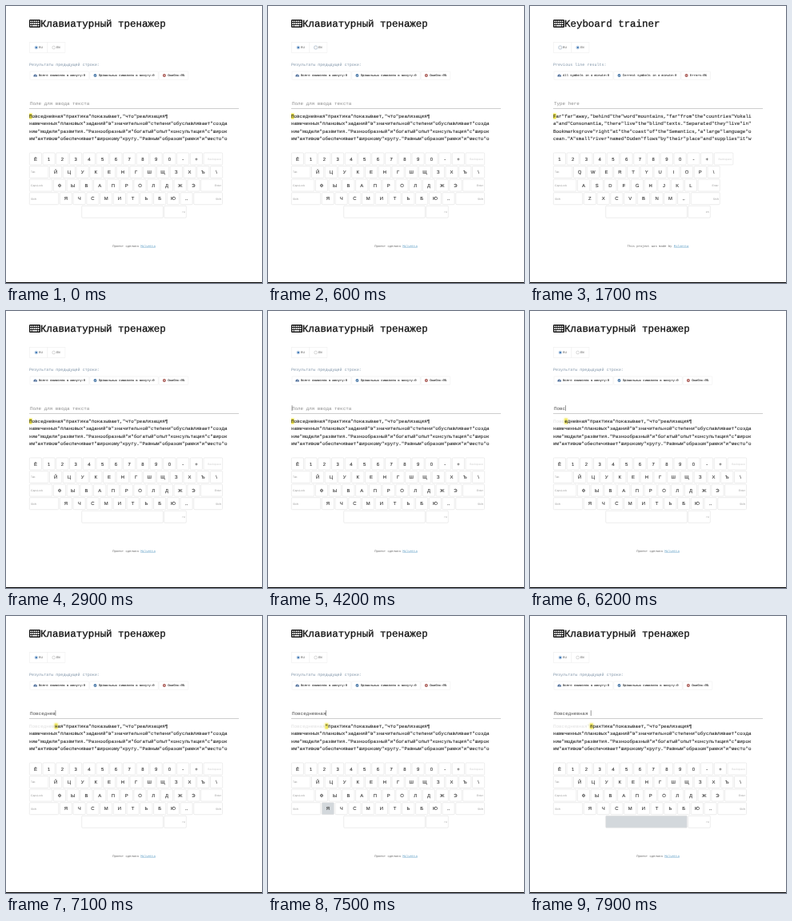
These frames come from a looping animation (320x347 px, 8 s). An HTML page:

```html
<!DOCTYPE html>
<html lang="ru">
<head>
<meta charset="utf-8">
<title>Keyboard trainer</title>
<style>
  html, body { margin: 0; width: 100%; height: 100%; overflow: hidden; background: #fff; }
  svg { display: block; width: 100vw; height: 100vh; text-rendering: geometricPrecision; }
  text { font-family: "Liberation Mono", "DejaVu Sans Mono", monospace; white-space: pre; }
  .sans { font-family: "Liberation Sans", Arial, sans-serif; }
</style>
</head>
<body>
<svg id="stage" viewBox="0 0 320 347"></svg>
<script>
const LOOP = 8000;
const CELL = 3.543;      // advance of one character in the practice text
const SMALL = 3.885;     // small label font size
const SMALL_CELL = SMALL * 0.6;
const PITCH = 16.75;     // distance between keys
const KEY = 15.75;
const X0 = 29;

const LANGS = {
  ru: {
    title: 'Клавиатурный тренажер',
    results: 'Результаты предыдущей строки:',
    stats: ['Всего символов в минуту:0', 'Правильных символов в минуту:0', 'Ошибок:0%'],
    hint: 'Поле для ввода текста',
    lines: [
      'Повседневная практика показывает, что реализация¶',
      'намеченных плановых заданий в значительной степени обуславливает созда',
      'ние модели развития. Разнообразный и богатый опыт консультация с широк',
      'им активом обеспечивает широкому кругу. Равным образом рамки и место о'
    ],
    rows: ['Ё1234567890-+', 'ЙЦУКЕНГШЩЗХЪ\\', 'ФЫВАПРОЛДЖЭ', 'ЯЧСМИТЬБЮ‥'],
    right: 270.8,
    made: 'Проект сделала '
  },
  en: {
    title: 'Keyboard trainer',
    results: 'Previous line results:',
    stats: ['All symbols in a minute:0', 'Correct symbols in a minute:0', 'Errors:0%'],
    hint: 'Type here',
    lines: [
      'Far far away, behind the word mountains, far from the countries Vokali',
      'a and Consonantia, there live the blind texts. Separated they live in ',
      'Bookmarksgrove right at the coast of the Semantics, a large language o',
      'cean. A small river named Duden flows by their place and supplies it w'
    ],
    rows: ['1234567890-+', 'QWERTYUIOP\\', 'ASDFGHJKL', 'ZXCVBNM‥'],
    right: 237.6,
    made: 'This project was made by '
  }
};
const AUTHOR = 'Milvetta';

// Times at which each character lands in the input
const TYPED = [5100, 5400, 5900, 6200, 6400, 6500, 6800, 7000, 7100, 7200, 7300, 7500, 7900];

// Key, time down, time up
const PRESSES = [
  ['Shift', 4800, 5300], ['П', 5100, 5200], ['О', 5400, 5500],
  ['Е', 6400, 6500], ['Д', 6500, 6600], ['Н', 6800, 6900],
  ['Е', 7000, 7100], ['Н', 7200, 7300], ['Я', 7500, 7600], ['Space', 7900, 8000]
];

const stage = document.getElementById('stage');
const esc = s => s.replace(/&/g, '&amp;').replace(/</g, '&lt;');

const rect = (x, y, w, h, fill, extra = '') =>
  `<rect x="${x}" y="${y}" width="${w}" height="${h}" fill="${fill}" ${extra}/>`;
const circle = (x, y, r, fill, extra = '') =>
  `<circle cx="${x}" cy="${y}" r="${r}" fill="${fill}" ${extra}/>`;
const path = (d, stroke, width) =>
  `<path d="${d}" fill="none" stroke="${stroke}" stroke-width="${width}"/>`;
const text = (s, x, y, size, fill, extra = '') =>
  `<text x="${x}" y="${y}" font-size="${size}" fill="${fill}" ${extra}>${esc(s)}</text>`;

function header(lang) {
  let out = rect(X0, 17, 14, 10, '#111', 'rx="1.2"');
  for (let row = 0; row < 2; row++)
    for (let i = 0; i < 5; i++)
      out += rect(30.2 + i * 2.4, 18.4 + row * 2.7, 1.7, 1.7, '#fff', 'rx=".2"');
  out += rect(30.2, 23.8, 1.7, 1.7, '#fff') + rect(32.6, 23.8, 6.5, 1.7, '#fff')
    + rect(39.8, 23.8, 1.7, 1.7, '#fff');
  return out + text(lang.title, 43, 26, 12.45, '#111', 'stroke="#111" stroke-width=".3"');
}

function radio(label, x, on, focus) {
  const ring = focus ? circle(x, 52, 2.7, '#d5e4f4') : '';
  const dot = on ? circle(x, 52, 1.2, '#3f78b5') : '';
  return ring + circle(x, 52, 1.9, '#fff', `stroke="${on ? '#7ea3cb' : '#aaa'}" stroke-width=".45"`)
    + dot + text(label, x + 3.3, 53.3, SMALL, '#555');
}

function radios(state) {
  const frame = 'stroke="#efefef" stroke-width=".6"';
  return rect(29.3, 45.3, 22.6, 13.4, '#fff', frame) + rect(51.9, 45.3, 22, 13.4, '#fff', frame)
    + radio('RU', 37.8, state.code === 'ru', state.radio === 'ru')
    + radio('EN', 59.7, state.code === 'en', state.radio === 'en');
}

const icons = [
  x => `<path d="M${x - 2.2} 88.5a2.3 2.3 0 1 1 4.4 0z" fill="#4f6f9a"/>`
    + path(`M${x} 88L${x + 0.9} 86.1`, '#fff', 0.5),
  x => circle(x, 87, 2, '#4a79a8') + path(`M${x - 1} 87l.8 .8 1.3-1.6`, '#fff', 0.5),
  x => circle(x, 87, 2, '#a5514c') + path(`M${x - 0.8} 86.2l1.6 1.6m0-1.6l-1.6 1.6`, '#fff', 0.5)
];

function stats(lang) {
  let x = 30;
  return lang.stats.map((label, i) => {
    const w = 15.6 + label.length * SMALL_CELL;
    const out = rect(x, 82, w, 10.4, '#fff', 'rx=".8" stroke="#eee" stroke-width=".6"')
      + icons[i](x + 6.7)
      + text(label, x + 11, 88.2, SMALL, '#3a3a3a', 'stroke="#3a3a3a" stroke-width=".12"');
    x += w + 0.9;
    return out;
  }).join('');
}

function input(lang, state) {
  const typed = lang.lines[0].slice(0, state.count);
  const value = typed
    ? text(typed, 30, 123.5, 5.905, '#4a4a4a')
    : text(lang.hint, 30, 123.5, 5.905, '#8c8c8c');
  const caret = state.caret ? rect(30 + state.count * CELL - 0.2, 118.2, 0.5, 6.8, '#333') : '';
  return value + caret + rect(X0, 128.1, 262, 0.7, '#b9b9b9');
}

function practice(lang, state) {
  const mark = s => s.replace(/ /g, '"');
  const x = X0 + state.count * CELL;
  const glow = state.count ? 0.6 : 0.2;
  let out = rect(x - 1, 134, CELL + 2, 7.8, '#f5ec5a',
    `rx="2" opacity="${glow}" filter="url(#glow)"`);
  out += rect(x, 134.6, CELL, 6.8, '#ece246', `opacity="${state.count ? 0.7 : 1}"`);
  lang.lines.forEach((line, i) => {
    const y = 140.3 + i * 9.1;
    const skip = i ? 0 : state.count;
    if (skip) out += text(mark(line.slice(0, skip)), X0, y, 5.905, '#dedede');
    out += text(mark(line.slice(skip)), X0 + skip * CELL, y, 5.905, '#222',
      'stroke="#222" stroke-width=".08"');
  });
  return out;
}

function key(x, row, w, down) {
  const y = 183.6 + row * 16.6;
  return rect(x + 0.3, y + 0.3, w - 0.6, 15, down ? '#d3d8dc' : '#fff',
    'rx="1" stroke="#e1e1e1" stroke-width=".6"');
}

function wideKey(label, x, row, right, side, down, fill = '#999') {
  return key(x, row, right - x, down)
    + text(label, side === 'end' ? right - 2 : x + 2, 192.7 + row * 16.6, 3.4, fill,
      `class="sans" text-anchor="${side}"`);
}

function keyboard(lang, state) {
  const leads = [['', 29], ['Tab', 54.2], ['CapsLock', 59.1], ['Shift', 67]];
  const tails = ['Backspace', '', 'Enter', 'Shift'];
  const held = name => state.held.includes(name);
  let out = '';
  lang.rows.forEach((chars, row) => {
    const [lead, start] = leads[row];
    const end = start + chars.length * PITCH;
    if (lead) out += wideKey(lead, X0, row, start - 1, 'start', held(lead));
    [...chars].forEach((c, i) => {
      const x = start + i * PITCH;
      out += key(x, row, KEY, held(c))
        + text(c, x + KEY / 2, 193.5 + row * 16.6, 5.9, '#333',
          'class="sans" text-anchor="middle" stroke="#333" stroke-width=".1"');
    });
    // Backspace keeps its width; the other tails reach the right edge
    if (tails[row])
      out += wideKey(tails[row], end, row, row ? lang.right : end + 24.2, 'end', false,
        row ? '#999' : '#ccc');
  });
  return out + key(94.4, 4, 102.2, held('Space'))
    + wideKey(state.code, 197.4, 4, 225.6, 'end', false);
}

function footer(lang) {
  const w = AUTHOR.length * SMALL_CELL;
  const x = 160 - (lang.made.length * SMALL_CELL + w) / 2;
  const link = x + lang.made.length * SMALL_CELL;
  return text(lang.made, x, 302, SMALL, '#666')
    + text(AUTHOR, link, 302, SMALL, '#5b9cc4')
    + rect(link, 302.5, w, 0.4, '#5b9cc4');
}

function stateAt(t) {
  return {
    code: t >= 700 && t < 1800 ? 'en' : 'ru',
    radio: t >= 600 && t < 1700 ? 'en' : t >= 1700 && t < 2900 ? 'ru' : '',
    count: TYPED.filter(at => t >= at).length,
    caret: t >= 5100 || (t >= 3200 && t < 3700) || (t >= 4200 && t < 4700),
    held: PRESSES.filter(([, down, up]) => t >= down && t < up).map(p => p[0])
  };
}

function draw(state) {
  const lang = LANGS[state.code];
  stage.innerHTML =
    '<defs><filter id="glow" x="-1" y="-1" width="3" height="3">'
    + '<feGaussianBlur stdDeviation=".9"/></filter></defs>'
    + rect(0, 0, 320, 347, '#fff') + rect(0, 346, 320, 1, '#000')
    + header(lang) + radios(state)
    + text(lang.results, X0, 74.8, 5.06, '#7f94a8')
    + stats(lang) + input(lang, state) + practice(lang, state)
    + keyboard(lang, state) + footer(lang);
}

let last = '';
function tick() {
  const state = stateAt(performance.now() % LOOP);
  const id = JSON.stringify(state);
  if (id !== last) {
    last = id;
    draw(state);
  }
  requestAnimationFrame(tick);
}
tick();
</script>
</body>
</html>
```
